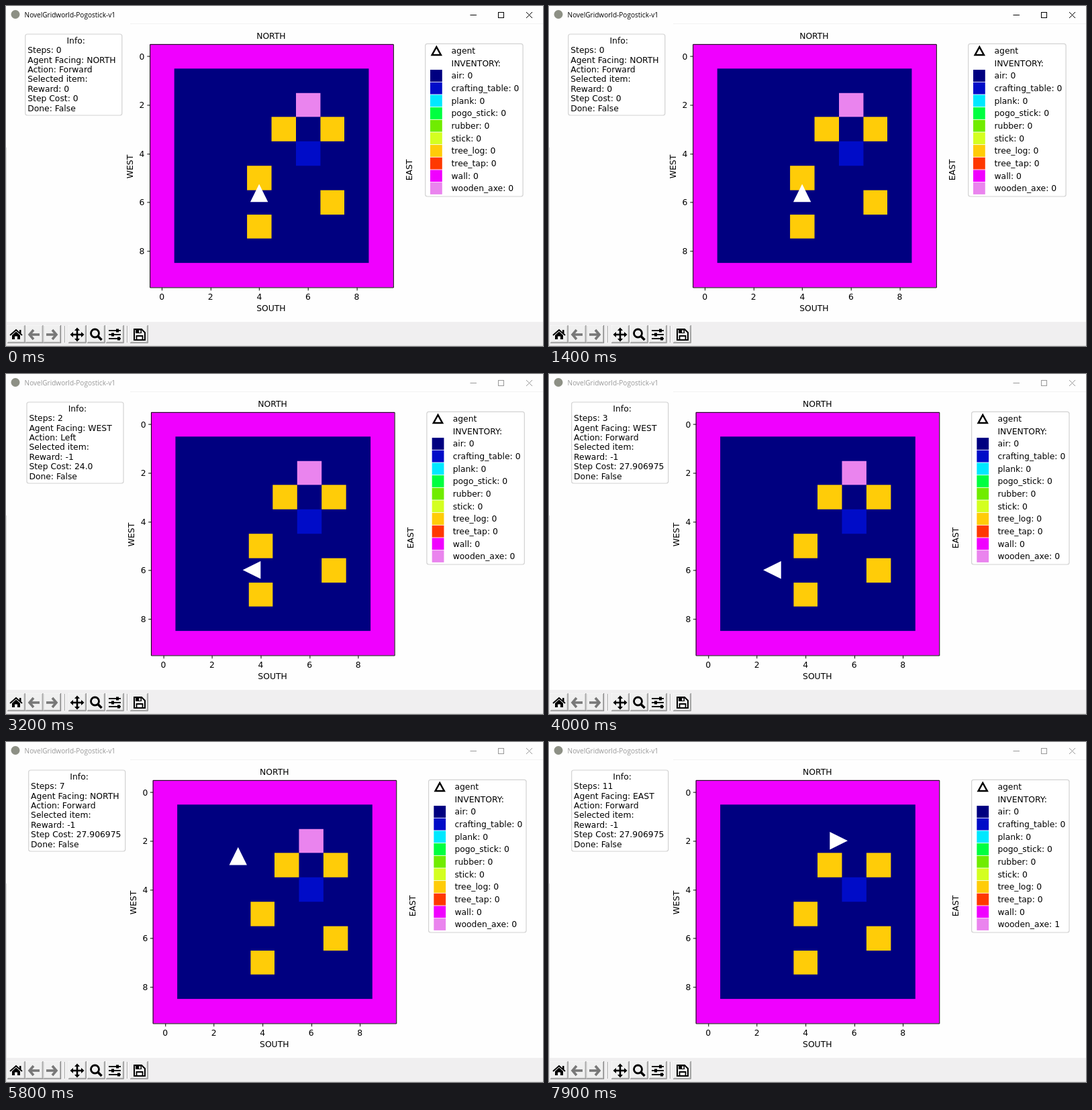
These frames come from a looping animation (800x507 px, 8 s). An HTML page with a canvas:

```html
<!DOCTYPE html>
<html lang="en">
<head>
<meta charset="utf-8">
<title>NovelGridworld-Pogostick-v1</title>
<style>
  html, body { margin: 0; width: 100%; height: 100%; overflow: hidden; background: #fff; }
  canvas { display: block; width: 100vw; height: 100vh; }
</style>
</head>
<body>
<canvas id="stage" width="800" height="507"></canvas>
<script>
const ctx = document.getElementById('stage').getContext('2d');
const LOOP = 8000;
// The window is 900 pixels wide, shown at 800; plot edges snap to window pixels
const FIG = 8 / 9;
const CELL = 40.8 * FIG, TOP = 64 * FIG, SIZE = CELL * 10;
const FONT = '12.35px "DejaVu Sans", sans-serif';
const UI_FONT = '10.05px "Open Sans", "Noto Sans", sans-serif';

const ITEMS = [
  ['air', '#000080'], ['crafting_table', '#000cc8'], ['plank', '#00e8ff'],
  ['pogo_stick', '#00ff40'], ['rubber', '#70ec00'], ['stick', '#d4ff20'],
  ['tree_log', '#ffcc08'], ['tree_tap', '#ff3800'], ['wall', '#f000ff'],
  ['wooden_axe', '#ea84ee']
];
const COLOR = Object.fromEntries(ITEMS);
const LOGS = [[5, 3], [7, 3], [4, 5], [7, 6], [4, 7]];
const AXE = [6, 2], TABLE = [6, 4];

const FACINGS = ['NORTH', 'EAST', 'SOUTH', 'WEST'];
const DIRS = [[0, -1], [1, 0], [0, 1], [-1, 0]];
const COST = { Forward: '27.906975', Left: '24.0', Right: '24.0', Break: '3600.0' };

// Time of each step, its action and the layout shift that follows
const STEPS = [
  [1600, 'Break', -0.7], [3100, 'Left', 2.2], [4000, 'Forward', 4.9],
  [4500, 'Right', 4.9], [5000, 'Forward', 4.9], [5400, 'Forward', 4.9],
  [5700, 'Forward', 4.9], [6200, 'Forward', 4.9], [6700, 'Right', 4.9],
  [7200, 'Forward', 4.9], [7700, 'Forward', 4.9]
];

function stateAt(t) {
  const s = { steps: 0, x: 4, y: 6, dir: 0, action: 'Forward', reward: 0, cost: '0', dx: 0, axe: 0 };
  for (const [time, action, dx] of STEPS) {
    if (t < time) break;
    s.steps++;
    s.action = action;
    s.dx = dx;
    s.reward = -1;
    s.cost = COST[action];
    if (action === 'Left') s.dir = (s.dir + 3) % 4;
    if (action === 'Right') s.dir = (s.dir + 1) % 4;
    const [vx, vy] = DIRS[s.dir];
    if (action === 'Forward') { s.x += vx; s.y += vy; }
    if (s.x + vx === AXE[0] && s.y + vy === AXE[1]) s.axe = 1;
  }
  return s;
}

const snap = v => Math.round(v / FIG) * FIG;
const snapLine = v => snap(v) + FIG / 2;

function rect(x, y, w, h, color) {
  ctx.fillStyle = color;
  ctx.fillRect(x, y, w, h);
}

function text(str, x, y, align = 'left', color = '#000', font = FONT) {
  ctx.font = font;
  ctx.textAlign = align;
  ctx.fillStyle = color;
  ctx.fillText(str, x, y);
}

function sideText(str, x, y) {
  ctx.save();
  ctx.translate(x, y);
  ctx.rotate(-Math.PI / 2);
  text(str, 0, 4.5, 'center');
  ctx.restore();
}

function path(points, close) {
  ctx.beginPath();
  for (let i = 0; i < points.length; i += 2) ctx.lineTo(points[i], points[i + 1]);
  if (close) ctx.closePath();
}

function fill(points, color) {
  path(points, true);
  ctx.fillStyle = color;
  ctx.fill();
}

function line(points, color, width = 1, close = false) {
  path(points, close);
  ctx.strokeStyle = color;
  ctx.lineWidth = width;
  ctx.stroke();
}

function frame(x, y, w, h) {
  ctx.beginPath();
  ctx.roundRect(x, y, w, h, 3);
  ctx.fillStyle = '#fff';
  ctx.fill();
  ctx.strokeStyle = '#d2d2d2';
  ctx.lineWidth = 1.2;
  ctx.stroke();
}

function titleBar(active) {
  const ink = active ? '#000' : '#999';
  ctx.beginPath();
  ctx.arc(14, 12.5, 6.5, 0, 7);
  ctx.fillStyle = '#8d9085';
  ctx.fill();
  text('NovelGridworld-Pogostick-v1', 27.6, 16.5, 'left', ink, UI_FONT);
  line([691.5, 13.5, 701, 13.5], ink);
  ctx.strokeRect(733.5, 9.5, 8, 8);
  line([775, 9, 784, 18], ink);
  line([784, 9, 775, 18], ink);
  rect(185, 26, 615, 1, '#f2f2f2');
}

function button(x) {
  rect(x, 476, 26.6, 26.6, '#696969');
  rect(x, 476, 25.7, 25.7, '#fff');
  rect(x + 0.9, 476.9, 24.8, 24.8, '#a0a0a0');
  rect(x + 0.9, 476.9, 23.9, 23.9, '#f0f0f0');
}

function arrow(cx, side) {
  line([cx + side, 483, cx + 7 * side, 490, cx + side, 497], '#787878', 3.6);
  line([cx + 6 * side, 490, cx - 8 * side, 490], '#787878', 3.6);
}

function toolbar() {
  rect(0, 471, 800, 36, '#f0eff0');
  rect(0, 211, 1, 296, '#dcdcdc');
  rect(0, 506, 800, 1, '#dedede');
  [2, 28.8, 55.5, 93, 121, 149, 185].forEach(button);
  for (const x of [87, 180]) {
    rect(x, 477, 1, 25, '#a8a8a8');
    rect(x + 1, 477, 1, 25, '#fff');
  }

  // home
  line([6, 491, 15, 483, 24, 491], '#000', 2);
  rect(20, 483, 2.5, 5, '#000');
  fill([9, 491, 15, 485.5, 21, 491, 21, 497, 17, 497, 17, 492.5, 13, 492.5, 13, 497, 9, 497], '#000');

  arrow(42, -1);
  arrow(68, 1);

  // pan
  line([97, 490, 115, 490], '#000', 2.6);
  line([106, 481, 106, 499], '#000', 2.6);
  for (let i = 0; i < 4; i++) {
    ctx.save();
    ctx.translate(106, 490);
    ctx.rotate(i * Math.PI / 2);
    fill([0, -10.5, 4, -6, -4, -6], '#000');
    ctx.restore();
  }

  // zoom
  ctx.beginPath();
  ctx.arc(132.5, 488, 6, 0, 7);
  ctx.lineWidth = 2.8;
  ctx.stroke();
  line([136.5, 492, 142.5, 498], '#000', 3.6);

  // sliders
  [[484, 164], [490, 157], [496, 166]].forEach(([y, x]) => {
    line([153, y, 171, y], '#000', 1.8);
    rect(x, y - 2.5, 4, 5, '#000');
  });

  // save
  line([191, 482, 202, 482, 207, 487, 207, 498, 191, 498], '#000', 2, true);
  rect(193, 482, 9, 6, '#000');
  rect(198, 483.5, 2.5, 3.5, '#f0f0f0');
  line([194.5, 498, 194.5, 492, 203.5, 492, 203.5, 498], '#000', 1.8);
}

function info(s) {
  const x = 28.8 + s.dx;
  frame(x, 42, 144, 121);
  text('Info:', x + 75.4, 55.8, 'center');
  [
    'Steps: ' + s.steps,
    'Agent Facing: ' + FACINGS[s.dir],
    'Action: ' + s.action,
    'Selected item:',
    'Reward: ' + s.reward,
    'Step Cost: ' + s.cost,
    'Done: False'
  ].forEach((str, i) => text(str, x + 3.4, 70.2 + 14.4 * i));
}

function legend(s) {
  const x = 624.7 + s.dx;
  frame(x, 56.3, 145.4, 227.7);
  line([x + 16.6, 61, x + 23.2, 73, x + 10, 73], '#000', 2.5, true);
  text('agent', x + 38.8, 71);
  text('INVENTORY:', x + 38.8, 89.8);
  ITEMS.forEach(([name, color], i) => {
    const y = 18.64 * i;
    rect(snap(x + 7.5), snap(95.1 + y), 20 * FIG, 20 * FIG, color);
    text(name + ': ' + (name === 'wooden_axe' ? s.axe : 0), x + 38.8, 108.4 + y);
  });
}

function world(s) {
  const left = 240.9 * FIG + s.dx;
  const px = i => snap(left + i * CELL);
  const py = j => snap(TOP + j * CELL);
  const tile = (i, j, color, n = 1) =>
    rect(px(i), py(j), px(i + n) - px(i), py(j + n) - py(j), color);

  tile(0, 0, COLOR.wall, 10);
  tile(1, 1, COLOR.air, 8);
  LOGS.forEach(([i, j]) => tile(i, j, COLOR.tree_log));
  tile(...TABLE, COLOR.crafting_table);
  if (!s.axe) tile(...AXE, COLOR.wooden_axe);

  const x0 = snapLine(left), x1 = snapLine(left + SIZE);
  const y0 = snapLine(TOP), y1 = snapLine(TOP + SIZE);
  line([x0, y0, x1, y0, x1, y1, x0, y1], '#000', 1, true);
  for (let k = 0; k < 10; k += 2) {
    const cx = left + (k + 0.5) * CELL, cy = TOP + (k + 0.5) * CELL;
    const tx = snapLine(cx), ty = snapLine(cy);
    line([tx, y1, tx, y1 + 4.3], '#000');
    line([x0 - 4.3, ty, x0, ty], '#000');
    text(k, cx, 437.8, 'center');
    text(k, left - 7.8, cy + 4.6, 'right');
  }

  const mid = left + SIZE / 2;
  text('NORTH', mid - 0.6, 49.3, 'center');
  text('SOUTH', mid - 0.6, 455.3, 'center');
  sideText('WEST', left - 29.6, 239.5);
  sideText('EAST', left + 386.4, 244.5);

  ctx.save();
  ctx.translate(left + (s.x + 0.5) * CELL - 0.2, TOP + (s.y + 0.5) * CELL - 0.3);
  ctx.rotate(s.dir * Math.PI / 2);
  fill([0, -26.7, 13.2, 0, -13.2, 0], '#fff');
  ctx.restore();
}

function draw(now) {
  const s = stateAt(now % LOOP);
  rect(0, 0, 800, 507, '#fefefe');
  titleBar(s.steps === 0);
  toolbar();
  info(s);
  world(s);
  legend(s);
  requestAnimationFrame(draw);
}
requestAnimationFrame(draw);
</script>
</body>
</html>
```
